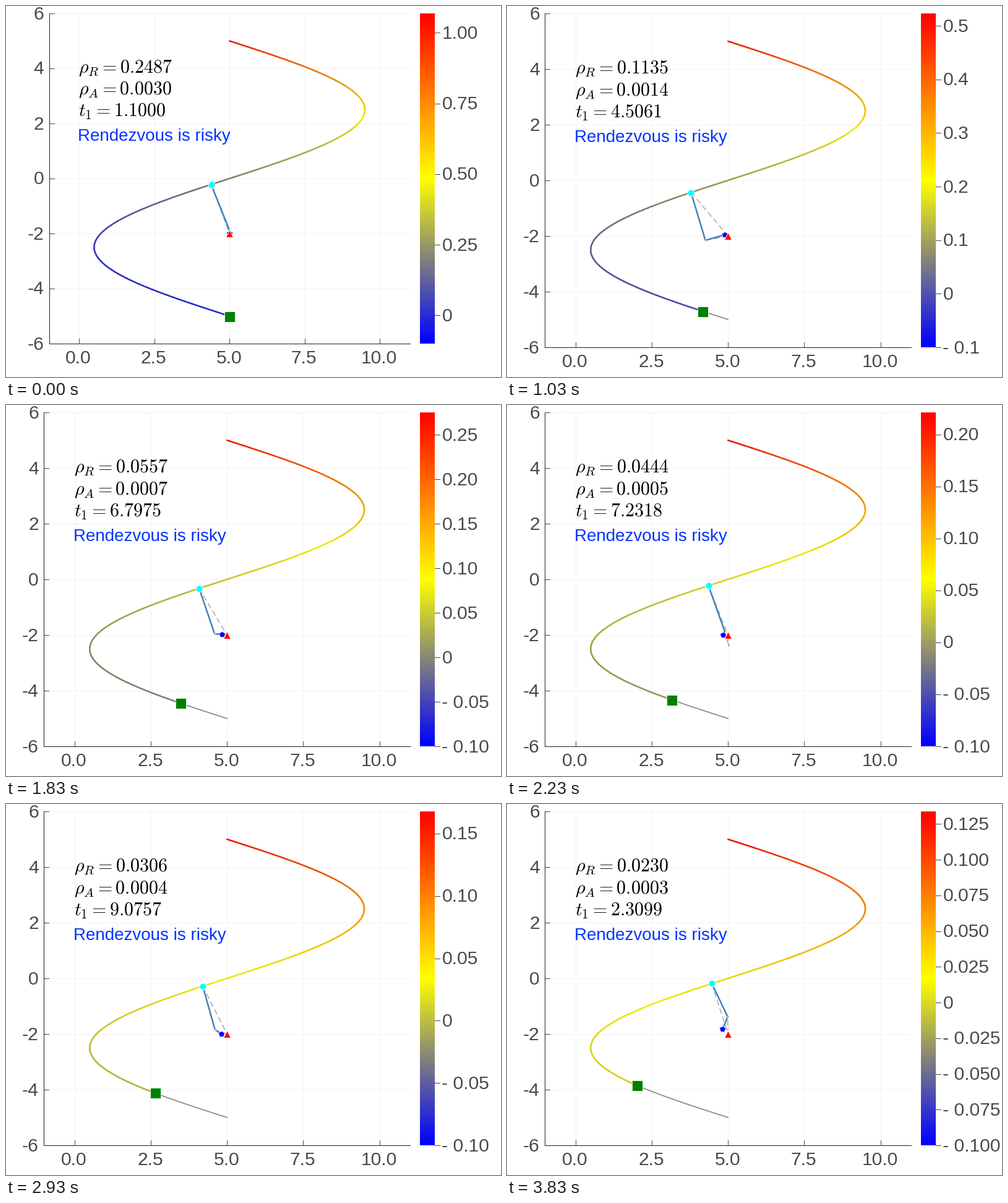
Write a matplotlib script that moves like this. It is 800 by 600 pixels and loops after 3.86 s.

```python
import math

import numpy as np
import matplotlib.pyplot as plt
from matplotlib.animation import FuncAnimation
from matplotlib.collections import LineCollection
from matplotlib.colors import LinearSegmentedColormap

W, H, DPI = 800, 600, 100
FRAMES, LOOP = 116, 3860
PX = 72 / DPI
RIGHT, TOP, BAR = 653, 12, (669, 693)
ZMIN = -0.1
INK, GREY = "#484848", "#808080"
CMAP = LinearSegmentedColormap.from_list(
    "risk", [(0, 0, 1), (1, 1, 0), (1, 0, 0)], N=512)

# Key readings of the two counters
KEYS = [0, 12, 30, 55, 67, 88, 115]
RHO = [.2487, .1838, .1135, .0557, .0444, .0306, .0230]
T1 = [1.1, 2.2812, 4.5061, 6.7975, 7.2318, 9.0757, 2.3099]


def bump(k, centre, width):
    return math.exp(-((k - centre) / width) ** 2)


def fall(k, power):
    return 1 / (1 + (k / 27) ** power)


def route(y):
    return 5 + 4.5 * np.sin(np.pi * y / 5)


def poses(k):
    """Meeting point, agent, turn and planned turn in data units."""
    wide, second, late = bump(k, 39, 17), bump(k, 88, 14), bump(k, 115, 15)
    dip = bump(k, 67, 6)
    y = -0.215 - 0.3 * wide - 0.09 * second + 0.03 * k / FRAMES
    agent = (4.82 + 0.18 * fall(k, 4), -2 + 0.06 * wide + 0.17 * late)
    turn = (5 - 0.98 * wide - 0.39 * second,
            -1.87 - 0.5 * wide ** 2 + 0.49 * late)
    plan = (turn[0] + 0.13 * dip, turn[1] - 0.5 * dip)
    return (route(y), y), agent, turn, plan


def tick_step(span):
    power = math.floor(math.log10(span))
    f = span / 10 ** power
    unit = 2 if f > 5 else 1 if f > 2.5 else 0.5
    return 0.5 * unit * 10 ** power


fig = plt.figure(figsize=(W / DPI, H / DPI), dpi=DPI, facecolor="white")
ax = fig.add_axes([0, 0, 1, 1])


def label(x, y, s, size=30, color=INK, **kw):
    ax.text(x, y, s, fontsize=size * PX, color=color, va="baseline",
            family="Liberation Sans", **kw)


def line(xs, ys, color, width, **kw):
    ax.plot(xs, ys, color=color, lw=width * PX, **kw)


def draw_axes(left, bottom, px, py):
    for v in np.arange(0, 11, 2.5):
        x = px(v)
        line([x, x], [TOP, bottom], "#f2f2f2", 1)
        line([x, x], [bottom, bottom - 8], INK, 1)
        label(x - 1, bottom + 32, f"{v:.1f}", ha="center")
    for v in range(-6, 7, 2):
        y = py(v)
        line([left, RIGHT], [y, y], "#f2f2f2", 1)
        line([left, left + 8], [y, y], INK, 1)
        label(left - 8.5, y + 9.5, str(v), ha="right")
    line([left, left, RIGHT], [TOP, bottom, bottom], "#202020", 1)


def draw_colorbar(bottom, zmax):
    ax.imshow(np.linspace(1, 0, 512)[:, None], cmap=CMAP, vmin=0, vmax=1,
              extent=(*BAR, bottom, TOP), aspect="auto")
    span = zmax - ZMIN
    step = tick_step(span)
    digits = len(f"{step:g}".split(".")[1])
    first = math.ceil(ZMIN / step - 1e-6)
    for n in range(first, math.floor(zmax / step) + 1):
        y = bottom - (n * step - ZMIN) / span * (bottom - TOP)
        line([BAR[1], BAR[1] + 8], [y, y], INK, 1)
        text = f"{abs(n) * step:.{digits}f}" if n else "0"
        label(704.5, y + 9.5, "- " + text if n < 0 else text)


def draw(k):
    ax.cla()
    # The opening picture has slightly wider margins
    left, bottom = (69.5, 546) if k == 0 else (61.3, 552)

    def px(x):
        return left + (np.asarray(x) + 1) * (RIGHT - left) / 12

    def py(y):
        return TOP + (6 - np.asarray(y)) * (bottom - TOP) / 12

    def path(points, color, width, **kw):
        x, y = zip(*points)
        line(px(x), py(y), color, width, **kw)

    def mark(p, marker, color, size, edge="white", width=1):
        ax.plot(px(p[0]), py(p[1]), marker=marker, color=color, ls="none",
                ms=size * PX, mec=edge, mew=width * PX)

    zmax = 0.08 + 0.9885 * fall(k, 1.97)
    rho, t1 = np.interp(k, KEYS, RHO), np.interp(k, KEYS, T1)
    meet, agent, turn, plan = poses(k)
    base = (5, -2)
    rover = -5 + 0.01 * k

    draw_axes(left, bottom, px, py)
    draw_colorbar(bottom, zmax)

    done = np.linspace(-5, rover, 40)
    line(px(route(done)), py(done), GREY, 1.6)
    ahead = np.linspace(rover, 5, 301)
    xy = np.column_stack([px(route(ahead)), py(ahead)])
    z = 0.94 * zmax * ((ahead[:-1] + 5) / 10) ** 2.2
    shades = CMAP((z - ZMIN) / (zmax - ZMIN))[:, :3] * 0.93
    ax.add_collection(LineCollection(
        np.stack([xy[:-1], xy[1:]], axis=1), lw=2.5 * PX,
        capstyle="round", colors=shades))

    path([meet, base], GREY, 1, dashes=(9, 5))
    path([base, plan], GREY, 1, dashes=(9, 5))
    path([turn, plan], GREY, 1)
    path([meet, turn, agent], "#4682b4", 2.5)
    mark(plan, "o", GREY, 3, width=0.7)
    mark(meet, "o", "cyan", 11)
    mark(agent, "p", "blue", 11, width=0.6)
    mark(base, "^", "red", 12)
    mark((route(rover), rover), "s", "green", 17, edge="#e4f0e4")

    x0 = float(px(0)) - 1
    rows = (r"$\rho_R = %.4f$" % rho, r"$\rho_A = %.4f$" % (0.0122 * rho),
            r"$t_1 = %.4f$" % t1)
    for y, s in zip((4, 3.2, 2.4), rows):
        ax.text(x0, py(y) + 7, s, fontsize=30 * PX, color="black",
                va="baseline", math_fontfamily="cm")
    label(x0 - 1, py(1.6) + 10, "Rendezvous is risky", 27.7, "#0433ff")

    ax.set_xlim(0, W)
    ax.set_ylim(H, 0)
    ax.axis("off")
    return []


anim = FuncAnimation(fig, draw, frames=FRAMES, interval=LOOP / FRAMES,
                     repeat=True, repeat_delay=0, blit=False)
plt.show()
```
